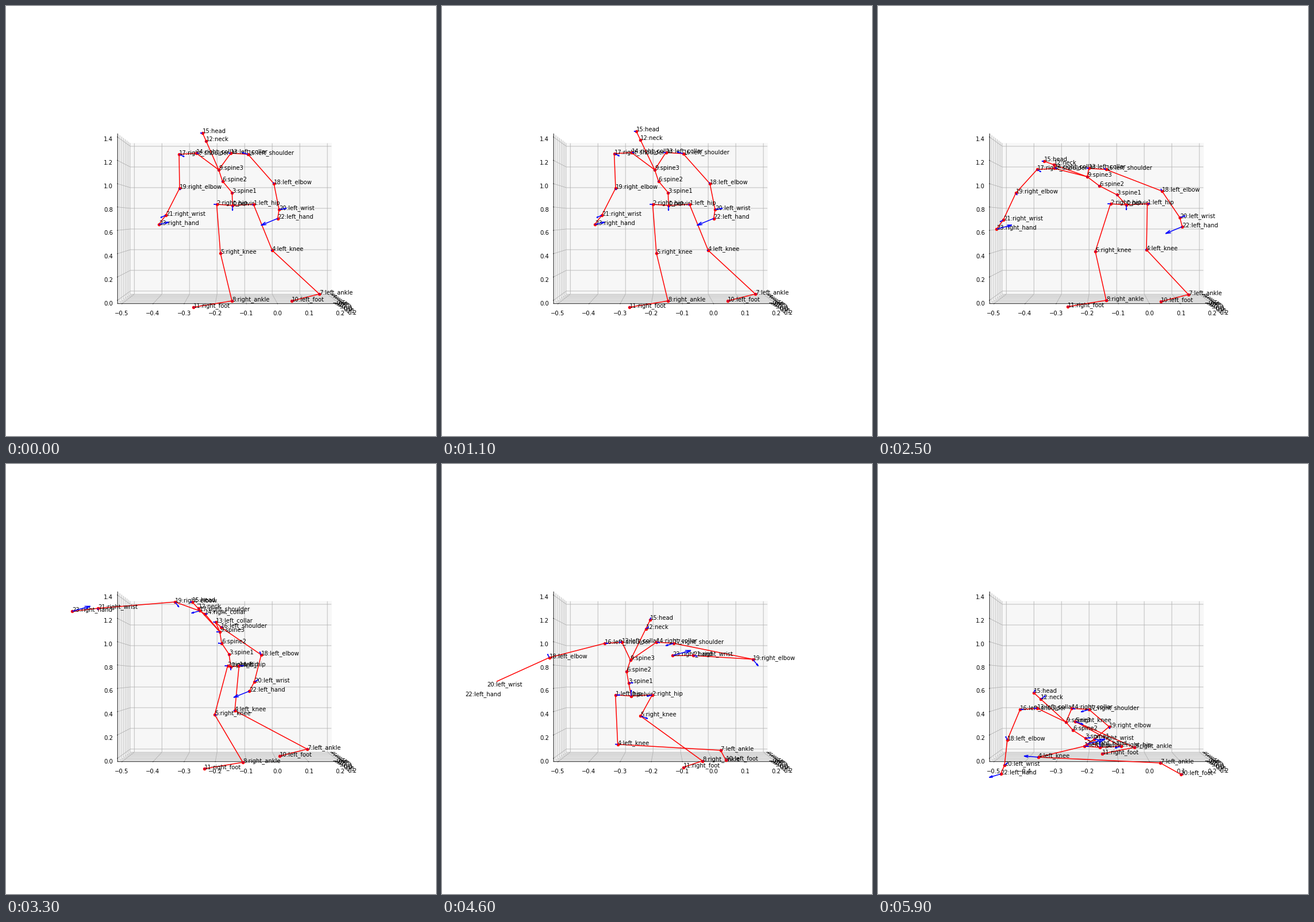
A matplotlib script that plays this animation: 748 px wide and 748 px high, repeating every 6 s.

```python
import matplotlib.pyplot as plt
import numpy as np
from matplotlib.animation import FuncAnimation
from matplotlib.collections import LineCollection

SIZE, DPI = 748, 72
FRAMES, STEP = 60, 100
POSES = [11, 25, 33, 41, 51, 59]
n = np.arange(FRAMES)


def ease(start, end):
    """Column that rises smoothly from 0 to 1 between two frames."""
    u = np.clip((n - start) / (end - start), 0, 1)
    return (u * u * (3 - 2 * u))[:, None]


def mix(a, b, u):
    return np.array(a) + (np.array(b) - np.array(a)) * u


def path(*points, extra=None):
    """Smooth track through the poses; the first pose is held from frame 0."""
    keys = {**dict(zip(POSES, points)), **(extra or {})}
    t = np.array(sorted(keys), float)
    p = np.array([keys[k] for k in sorted(keys)], float)
    m = np.gradient(p, t, axis=0)
    m[0] = 0
    now = np.maximum(n, t[0])
    i = np.clip(np.searchsorted(t, now, side="right") - 1, 0, len(t) - 2)
    h = (t[i + 1] - t[i])[:, None]
    u = (now - t[i])[:, None] / h
    return ((1 + 2 * u) * (1 - u) ** 2 * p[i] + u * (1 - u) ** 2 * h * m[i]
            + u * u * (3 - 2 * u) * p[i + 1] + u * u * (u - 1) * h * m[i + 1])


# Joints that lead the motion, in stage pixels
body = {
    "pelvis": path((394, 347), (432, 346), (391, 353), (322, 378), (354, 435), (386, 493)),
    "spine3": path((370, 285), (364, 297), (372, 292), (325, 314), (337, 377), (327, 449)),
    "head": path((338, 218), (289, 270), (324, 240), (346, 245), (359, 312), (271, 398)),
    "left_knee": path((463, 425), (467, 424), (398, 429), (331, 458), (290, 512), (279, 510)),
    "right_knee": path((373, 430), (378, 427), (363, 436), (287, 454), (406, 424), (343, 448)),
    "left_ankle": path((545, 501), (540, 502), (524, 496), (523, 491), (453, 508), (491, 520)),
    "right_ankle": path((393, 513), (397, 512), (412, 519), (412, 524), (487, 506), (446, 493)),
    "left_elbow": path((466, 309), (494, 322), (444, 332), (249, 327), (168, 367), (225, 480)),
    "right_elbow": path((302, 317), (240, 325), (294, 240), (470, 289), (498, 385), (402, 457),
                        extra={45: (537, 330)}),
    "left_wrist": path((475, 354), (525, 368), (432, 379), (171, 361), (88, 402), (220, 524),
                       extra={21: (543, 354), 46: (78, 386)}),
    "right_wrist": path((278, 364), (218, 372), (160, 251), (354, 260), (453, 405), (376, 479),
                        extra={36: (185, 205)}),
}
body["head"] += (1 - ease(0, 11)) * (4, 3)

# The body turns half round: hips and shoulders swap sides
turn = np.pi * np.clip((n - 25) / 20, 0, 1)[:, None]
facing = np.cos(turn)
pelvis, spine3, head = body["pelvis"], body["spine3"], body["head"]
chest = mix(spine3, head, 0.39) + (2, -2)
half_chest = np.hstack([60 * facing, 15 * np.sin(turn)])
half_hips = np.hstack([32 * facing, 0 * facing])

body["spine1"] = mix(pelvis, spine3, 0.36) + np.hstack([2 + 6 * facing, 0 * facing])
body["spine2"] = mix(body["spine1"], spine3, 0.5) - (5, 0)
body["neck"] = mix(spine3, head, 0.78)

for side, sign in (("left", 1), ("right", -1)):
    body[f"{side}_hip"] = pelvis + (4.5, -2) + sign * half_hips
    body[f"{side}_shoulder"] = chest + sign * half_chest
    body[f"{side}_collar"] = chest + sign * half_chest / 2 - (0, 2)
    elbow, wrist = body[f"{side}_elbow"], body[f"{side}_wrist"]
    body[f"{side}_hand"] = wrist + 0.3 * (wrist - elbow) + (-5, 2)

tuck = np.exp(-((n - 51) / 6) ** 2)[:, None]
body["left_foot"] = body["left_ankle"] + mix((-48, 12), (36, 20), ease(36, 52))
body["right_foot"] = body["right_ankle"] + mix((-67, 11), (0, 11), tuck)

# Rotation arrows drift from one direction to another
spins = {
    "pelvis": mix((0, 9), (0, -12), ease(27, 50)),
    "left_hip": mix((-2, 1), (8, 0), ease(15, 33)),
    "right_hip": mix((-5, 0), (-10, 3), ease(33, 51)),
    "spine1": mix((1, 1), (9, -1), ease(33, 51)),
    "spine2": mix((-1, 0), (-6, 0), np.sin(turn)),
    "spine3": mix((0, 1), (-6, 0), np.sin(turn)),
    "left_knee": mix((-2, 0), (-25, -2), ease(43, 59)),
    "right_knee": mix((1, 0), (14, 5), ease(27, 51)),
    "neck": mix((0, 1), (8, -6), ease(33, 55)),
    "head": mix((-4, 0), (2, -5), ease(33, 51)),
    "left_collar": mix((-4, 0), (-6, 0), ease(33, 55)),
    "right_collar": mix((4, 0), (6, 1), ease(33, 51)),
    "left_shoulder": mix((-10, -3), (6, 0), ease(11, 43)),
    "right_shoulder": mix((9, 4), (-14, 4), ease(23, 33)),
    "left_elbow": mix((-1, -2), (-3, -6), ease(11, 41)),
    "right_elbow": mix((1, 3), (12, 14), np.exp(-((n - 41) / 10) ** 2)[:, None]),
    "left_wrist": mix((13, -2), (5, -4), ease(11, 41)),
    "right_wrist": mix((-9, 4), (8, 1), ease(15, 51)),
    "left_hand": mix((-29, 12), (-20, 6), ease(25, 55)),
    "right_hand": mix((17, -4), (32, -9), ease(11, 35)),
}
still = np.full((FRAMES, 2), (1, 0))

SIDES = "left_{0} right_{0} "
names = ("pelvis " + SIDES.format("hip") + "spine1 " + SIDES.format("knee")
         + "spine2 " + SIDES.format("ankle") + "spine3 " + SIDES.format("foot")
         + "neck " + SIDES.format("collar") + "head "
         + "".join(SIDES.format(j) for j in ("shoulder", "elbow", "wrist", "hand"))).split()
parents = [0, 0, 0, 1, 2, 3, 4, 5, 6, 7, 8, 9, 9, 9, 12, 13, 14, 16, 17, 18, 19, 20, 21]
joints = np.array([body[name] for name in names])
vectors = np.array([spins.get(name, still) for name in names])


def with_margin(lo, hi):
    pad = (hi - lo) / 48
    return lo - pad, hi + pad


fig = plt.figure(figsize=(SIZE / DPI, SIZE / DPI), dpi=DPI, facecolor="white")
box = fig.add_subplot(projection="3d")
# A hair off the straight view, so the left wall and the floor are shown
box.view_init(elev=1e-3, azim=1e-3, vertical_axis="y")
box.set(xlim=with_margin(-0.5, 0.2), ylim=with_margin(0, 1.4),
        zlim=with_margin(-0.5, 0.2))
box.zaxis.set_pane_color((0.97, 0.97, 0.97, 1))

# Flat layer in pixels over the same square; it clips the skeleton
flat = fig.add_axes([0.1275, 0.11, 0.77, 0.77])
flat.set(xlim=(SIZE * 0.1275, SIZE * 0.8975), ylim=(SIZE * 0.89, SIZE * 0.12))
flat.axis("off")


def add_lines(color, zorder):
    lines = LineCollection([], colors=color, linewidths=1.5, zorder=zorder)
    return flat.add_collection(lines, autolim=False)


bones = add_lines("red", 2)
labels = [flat.text(0, 0, f"{i}:{name}", zorder=3) for i, name in enumerate(names)]
dots = flat.scatter(*joints[:, 0].T, s=20, c="red", zorder=4)
arrows = add_lines("blue", 5)


def rotate(v, degrees):
    c, s = np.cos(np.radians(degrees)), np.sin(np.radians(degrees))
    return np.array([c * v[0] - s * v[1], s * v[0] + c * v[1]])


def arrow(start, v):
    tip = start + v
    return [[start, tip]] + [[tip, tip - 0.3 * rotate(v, a)] for a in (15, -15)]


def draw(frame):
    pose = joints[:, frame]
    bones.set_segments([[pose[p], pose[i]] for i, p in enumerate(parents, 1)])
    dots.set_offsets(pose)
    arrows.set_segments([line for start, v in zip(pose, vectors[:, frame])
                         for line in arrow(start, v)])
    for label, point in zip(labels, pose):
        label.set_position(point)
    return [bones, dots, arrows, *labels]


anim = FuncAnimation(fig, draw, frames=FRAMES, interval=STEP,
                     init_func=lambda: draw(0), repeat=True, repeat_delay=0)
plt.show()
```
